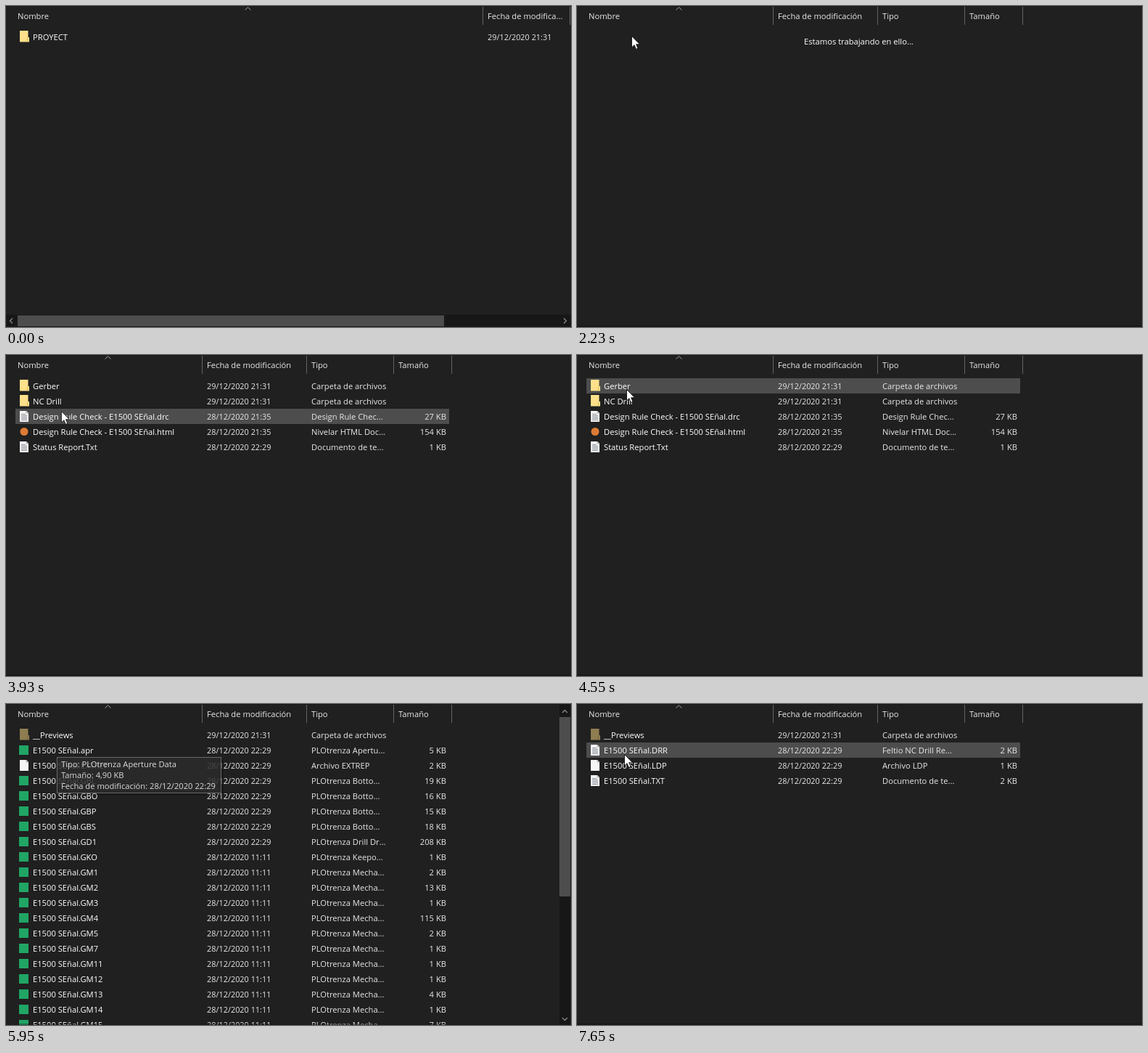
An HTML page that plays this animation: 779x442 px, repeating every 8000 ms.

```html
<!DOCTYPE html>
<html lang="es">
<head>
<meta charset="utf-8">
<title>Explorador de archivos</title>
<style>
html, body { margin: 0; width: 100%; height: 100%; overflow: hidden; background: #202020; }
svg { display: block; width: 779px; height: 442px; font: 11.2px "Open Sans", "Noto Sans", sans-serif; }
text { white-space: pre; }
</style>
</head>
<body>
<svg id="stage" viewBox="0 0 779 442"></svg>
<script>
const LOOP = 8000, TOP = 32, ROW = 21;
const stage = document.getElementById('stage');

// Each row: icon | name | date | type | size
const parse = list => list.trim().split('\n').map(line => line.split('|'));
const CARPETA = '29/12/2020 21:31|Carpeta de archivos|';
const PREVIEWS = 'dim|__Previews|' + CARPETA;

const project = parse(`${PREVIEWS}
folder|History|${CARPETA}
folder|Project Outputs for E1500_señal|${CARPETA}
sch|02_Placa_de_Senal.SchDoc|28/12/2020 2:04|Feltio Schematic ...|182 KB
sch|05_ADC_Board.SchDoc|15/09/2020 21:51|Feltio Schematic ...|369 KB
sch|06_ADC_Board.SchDoc|24/12/2020 17:44|Feltio Schematic ...|385 KB
text|debug.log|25/11/2020 17:42|Documento de te...|1 KB
web|E1500 SEñal.html|28/12/2020 11:17|Nivelar HTML Doc...|7 KB
pcb|E1500 SEñal.PcbDoc|28/12/2020 2:39|Feltio PCB Docu...|4.396 KB
web|E1500 SEñal.PcbDoc.htm|28/12/2020 21:08|Nivelar HTML Doc...|5 KB
text|E1500 SEñal.txt|28/12/2020 11:17|Documento de te...|1 KB
pcb|E1500_señal.PrjPcb|28/12/2020 2:49|Feltio PCB Project|41 KB
page|E1500_señal.PrjPcbStructure|28/12/2020 22:49|Archivo PRJPCBST...|1 KB
job|OutJob_4 CAPAS.OutJob|28/12/2020 2:49|Feltio Output Jo...|65 KB`);

const outputs = parse(`folder|Gerber|${CARPETA}
folder|NC Drill|${CARPETA}
text|Design Rule Check - E1500 SEñal.drc|28/12/2020 21:35|Design Rule Chec...|27 KB
web|Design Rule Check - E1500 SEñal.html|28/12/2020 21:35|Nivelar HTML Doc...|154 KB
text|Status Report.Txt|28/12/2020 22:29|Documento de te...|1 KB`);

const layers = `apr,Apertu,5 EXTREP,,2 GBL,Botto,19 GBO,Botto,16 GBP,Botto,15 GBS,Botto,18 GD1,Drill Dr,208
GKO,Keepo,1 GM1,Mecha,2 GM2,Mecha,13 GM3,Mecha,1 GM4,Mecha,115 GM5,Mecha,2 GM7,Mecha,1
GM11,Mecha,1 GM12,Mecha,1 GM13,Mecha,4 GM14,Mecha,1 GM15,Mecha,7`;
const gerber = [...parse(PREVIEWS), ...layers.match(/\w+,[^,]*,\d+/g).map((item, i) => {
  const [ext, kind, size] = item.split(',');
  return [kind ? 'cam' : 'page', 'E1500 SEñal.' + ext, '28/12/2020 ' + (i < 7 ? '22:29' : '11:11'),
    kind ? `PLOtrenza ${kind}...` : 'Archivo ' + ext, size + ' KB'];
})];

const drill = parse(`${PREVIEWS}
text|E1500 SEñal.DRR|28/12/2020 22:29|Feltio NC Drill Re...|2 KB
page|E1500 SEñal.LDP|28/12/2020 22:29|Archivo LDP|1 KB
text|E1500 SEñal.TXT|28/12/2020 22:29|Documento de te...|2 KB`);

const root = [['folder', 'PROYECT', '29/12/2020 21:31', '', '']];

// [start, rows, selected row, click shown]
const scenes = [
  [0, root, -1], [2000, root, 0, true], [2080, root, 0], [2230, null, -1],
  [2300, project, -1], [3240, project, 2, true], [3390, project, 2], [3470, outputs, -1],
  [4780, outputs, 0, true], [4860, outputs, 0], [5010, gerber, -1],
  [6570, outputs, 0], [7570, outputs, 1, true], [7650, drill, -1]
];

// Cursor moves: [start, end, steps, from x, y, to x, y]
const moves = [
  [760, 1540, 11, 735, 421, 115, 91], [1610, 1850, 4, 115, 91, 75, 41],
  [2780, 3010, 4, 75, 41, 78, 85], [3930, 4550, 9, 78, 85, 68, 47],
  [5340, 5640, 5, 68, 47, 70, 54], [6800, 6880, 2, 11, 80, 17, 76],
  [6960, 7110, 3, 17, 76, 64, 73.5], [7180, 7340, 3, 64, 73.5, 65, 69]
];

const tips = [
  { x: 70, y: 73, w: 227, lines: ['Tipo: PLOtrenza Aperture Data', 'Tamaño: 4,90 KB', 'Fecha de modificación: 28/12/2020 22:29'],
    fade: [[0, 0], [5490, .3], [5570, .6], [5640, .92], [5950, .84], [6030, .6], [6100, .4], [6180, .2], [6250, 0]] },
  { x: 17, y: 95, w: 226, lines: ['Tipo: Design Rule Check Report', 'Tamaño: 26,9 KB', 'Fecha de modificación: 28/12/2020 21:35'],
    fade: [[0, 0], [6800, .4], [6880, .9], [7030, .65], [7110, .42], [7180, .25], [7260, .1], [7340, 0]] }
];

const rect = (x, y, w, h, fill, more = '') => `<rect x="${x}" y="${y}" width="${w}" height="${h}" fill="${fill}" ${more}/>`;
const path = (d, stroke, more = 'fill="none"') => `<path d="${d}" stroke="${stroke}" ${more}/>`;
const text = (x, y, str, fill = '#e8e8e8', more = '') => `<text x="${x}" y="${y}" fill="${fill}" ${more}>${str}</text>`;
const last = (list, t) => list.filter(item => item[0] <= t).pop();

const folder = (fill, edge) => `<path d="M19 1H30.5V10H32V16.5H19Z" fill="${fill}"/>` + path('M29.5 10.5V16.5', edge);
const page = '<path d="M19 2H28L31 5V17H19Z" fill="#f4f4f4"/>' + path('M28 2V5H31', '#aaa');
const icons = {
  folder: folder('#ffe08a', '#e3b95c'),
  dim: folder('#8f7d50', '#75653e'),
  page,
  text: page + path('M21 6.5H27M21 8.5H29M21 10.5H29M21 12.5H29M21 14.5H29', '#8b929b'),
  sch: rect(17, 4, 15, 11, '#f2d377'),
  web: '<circle cx="25" cy="9.5" r="5.5" fill="#dd7a35"/>',
  pcb: rect(18, 4, 14, 11, '#15785a'),
  cam: rect(18, 3, 13, 13, '#20a565'),
  job: rect(18, 3, 14, 13, '#f2d377') + rect(17, 9, 8, 8, '#f4f4f4')
};

function header(wide) {
  const caret = wide ? 333.5 : 140.5;
  const bars = wide ? [657.5, 777.5] : [270.5, 414.5, 534.5, 614.5];
  const labels = wide ? [[664, 'Fecha de modifica...']]
    : [[277, 'Fecha de modificación'], [421, 'Tipo'], [541, 'Tamaño']];
  return rect(0, 0, 779, 1, '#181818') + text(16, 18, 'Nombre') +
    path(`M${caret - 4} 5.5L${caret} 1.8L${caret + 4} 5.5`, '#a0a0a0') +
    bars.map(x => path(`M${x} 1V26`, '#636363')).join('') +
    labels.map(([x, label]) => text(x, 18, label)).join('');
}

function rowView([icon, name, date, type, size], i, wide, selected, hovered) {
  const y = TOP + i * ROW, w = wide ? 766 : 598;
  const back = selected ? rect(13.5, y + 1.5, w - 2, 19, '#777', 'stroke="#999"')
    : hovered ? rect(13, y, w, ROW, '#4d4d4d') : '';
  return back + `<g transform="translate(0 ${y + 1})">${icons[icon]}</g>` +
    text(37, y + 15, name, '#fff') +
    text(wide ? 664 : 277, y + 15, date, '#e8e8e8', 'font-size="10.9"') +
    text(421, y + 15, type) + text(607, y + 15, size, '#e8e8e8', 'text-anchor="end"');
}

const bottomBar = rect(0, 425, 779, 17, '#171717') + rect(16, 426, 588, 15, '#4d4d4d') +
  path('M9 430L5.5 433.5L9 437M769 430L772.5 433.5L769 437', '#868686', 'fill="none" stroke-width="1.4"');
const sideBar = rect(763, 0, 15, 442, '#171717') + rect(763, 18, 15, 247, '#4d4d4d') +
  path('M767 12L770.5 8.5L774 12M767 432L770.5 435.5L774 432', '#868686', 'fill="none" stroke-width="1.4"');

function tipView({ x, y, w, lines, fade }, t) {
  const alpha = last(fade, t)[1];
  return alpha ? `<g opacity="${alpha}">` + rect(x + 3, y + 3, w, 50, '#000', 'opacity=".2"') +
    rect(x + .5, y + .5, w - 1, 49, '#2b2b2b', 'stroke="#767676"') +
    lines.map((line, i) => text(x + 6, y + 14 + i * 15, line, '#fff')).join('') + '</g>' : '';
}

function cursorAt(t) {
  const move = last(moves, t);
  if (!move || t >= 5870 && t < 6800) return null;
  const [start, end, n, x0, y0, x1, y1] = move;
  const step = Math.floor((t - start) / (end - start) * (n - 1) + 1e-6) + 1;
  const p = Math.min(1, step / n), ease = p * (2 - p);
  return [x0 + (x1 - x0) * ease, y0 + (y1 - y0) * ease];
}

function render(t) {
  const [, rows, selected, click] = last(scenes, t);
  const cursor = cursorAt(t), wide = rows === root;
  const hover = cursor ? Math.floor((cursor[1] - TOP) / ROW) : -1;
  let out = header(wide);
  if (rows) out += rows.map((row, i) => rowView(row, i, wide, i === selected, i === hover)).join('');
  else out += text(313, 53, 'Estamos trabajando en ello...', '#fff');
  out += wide ? bottomBar : rect(0, 440, 779, 2, '#181818', rows === gerber ? 'opacity=".4"' : '');
  if (rows === gerber) out += sideBar;
  out += tips.map(tip => tipView(tip, t)).join('');
  if (cursor) {
    const [x, y] = cursor;
    if (click) out += `<circle cx="${x - 1}" cy="${y}" r="12" fill="#dcc814" opacity=".8"/>`;
    out += `<g transform="translate(${x} ${y})">` +
      path('M.5 .5V16L4 12.7L6.5 18.4L9 17.3L6.6 11.8H11.5Z', '#111', 'fill="#fff" stroke-width=".9"') + '</g>';
  }
  return out;
}

let shown = '';
function tick() {
  const next = render(performance.now() % LOOP);
  if (next !== shown) stage.innerHTML = shown = next;
  requestAnimationFrame(tick);
}
tick();
</script>
</body>
</html>
```
